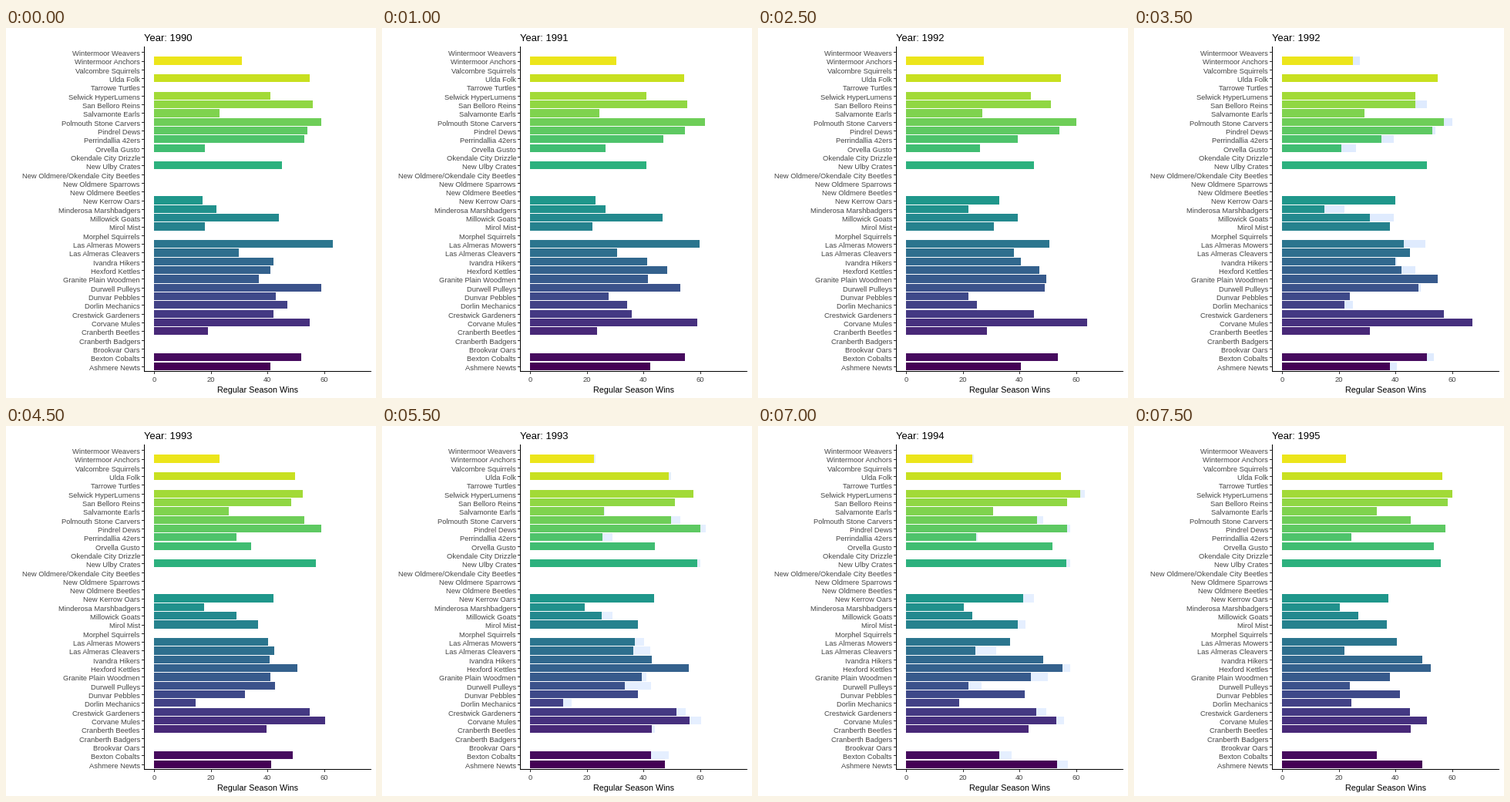
A matplotlib script for the animation above (8000 ms loop, 480 by 480 pixels).

```python
import numpy as np
import matplotlib
import matplotlib.pyplot as plt
from matplotlib.animation import FuncAnimation
from matplotlib.patches import Rectangle

SIZE, DPI = 480, 96
FRAMES, INTERVAL = 16, 500
FIRST_YEAR = 1990
KEYS = [0, 3, 7, 10, 13, 17]          # frames that land exactly on a season
X0, PER_WIN = 192.035, 3.679          # pixel of zero wins, pixels per win
Y0, ROW = 438.613, 11.317             # centre of the lowest row, row pitch
GREY, TICK = "#444444", "#333333"
TRAILS = ["#e5efff", "#eaf3ff", "#dfebfe", "#e5efff", "#e5efff", "#e5efff"]

names, wins = [], []


def team(name, *seasons):
    names.append(name)
    wins.append(seasons or (0,) * len(KEYS))


# bottom row first; wins for 1990 to 1995
team("Ashmere Newts", 41, 43, 38, 43, 57, 42)
team("Bexton Cobalts", 52, 56, 51, 48, 32, 35)
team("Brookvar Oars")
team("Cranberth Badgers")
team("Cranberth Beetles", 19, 26, 31, 44, 41, 50)
team("Corvane Mules", 55, 61, 67, 57, 55, 47)
team("Crestwick Gardeners", 42, 33, 57, 54, 47, 43)
team("Dorlin Mechanics", 47, 28, 22, 11, 13, 36)
team("Dunvar Pebbles", 43, 20, 24, 36, 42, 41)
team("Durwell Pulleys", 59, 50, 48, 40, 20, 28)
team("Granite Plain Woodmen", 37, 44, 55, 34, 50, 26)
team("Hexford Kettles", 41, 52, 42, 55, 58, 47)
team("Ivandra Hikers", 42, 41, 40, 41, 47, 52)
team("Las Almeras Cleavers", 30, 31, 45, 41, 27, 17)
team("Las Almeras Mowers", 63, 58, 43, 39, 33, 48)
team("Morphel Squirrels")
team("Mirol Mist", 18, 24, 38, 36, 42, 32)
team("Millowick Goats", 44, 48, 31, 28, 20, 34)
team("Minderosa Marshbadgers", 22, 29, 15, 19, 20, 21)
team("New Kerrow Oars", 17, 26, 40, 43, 45, 30)
team("New Oldmere Beetles")
team("New Oldmere Sparrows")
team("New Oldmere/Okendale City Beetles")
team("New Ulby Crates", 45, 39, 51, 60, 57, 55)
team("Okendale City Drizzle")
team("Orvella Gusto", 18, 31, 21, 41, 50, 57)
team("Perrindallia 42ers", 53, 44, 35, 26, 25, 24)
team("Pindrel Dews", 54, 55, 53, 62, 56, 59)
team("Polmouth Stone Carvers", 59, 63, 57, 51, 47, 44)
team("Salvamonte Earls", 23, 25, 29, 25, 28, 39)
team("San Belloro Reins", 56, 55, 47, 49, 55, 62)
team("Selwick HyperLumens", 41, 41, 47, 55, 63, 57)
team("Tarrowe Turtles")
team("Ulda Folk", 55, 54, 55, 47, 53, 60)
team("Valcombre Squirrels")
team("Wintermoor Anchors", 31, 30, 25, 22, 24, 21)
team("Wintermoor Weavers")

# progress in seasons, bar lengths and rounded season for every frame
progress = np.interp(range(FRAMES), KEYS, range(len(KEYS)))
lengths = np.array([[np.interp(p, range(len(KEYS)), w) for w in wins]
                    for p in progress])
season = np.floor(progress + 0.5 + 1e-9).astype(int)


def snap(v):
    return int(np.floor(v + 0.5))


def px_x(value):
    return snap(X0 + PER_WIN * value)


fig = plt.figure(figsize=(SIZE / DPI, SIZE / DPI), dpi=DPI, facecolor="white")
ax = fig.add_axes([0, 0, 1, 1])
ax.set_xlim(0, SIZE)
ax.set_ylim(SIZE, 0)
ax.axis("off")


def box(left, top, right, bottom, color, z=1):
    patch = Rectangle((left, top), right - left, bottom - top, facecolor=color,
                      linewidth=0, antialiased=False, zorder=z)
    return ax.add_patch(patch)


def write(x, y, text, size, color="black", ha="left"):
    return ax.text(x, y, text, fontsize=size * 72 / DPI, color=color, ha=ha,
                   va="baseline", family="Liberation Sans")


left = px_x(0)
viridis = matplotlib.colormaps["viridis"]
bars, trails = [], []
for i, name in enumerate(names):
    y = Y0 - i * ROW
    top, bottom = snap(y - 0.45 * ROW), snap(y + 0.45 * ROW)
    trails.append(box(left, top, left, bottom, "white", 2))
    bars.append(box(left, top, left, bottom, viridis(i / (len(names) - 1)), 3))
    box(176, snap(y), 179, snap(y) + 1, TICK)
    write(174, snap(y + 4.9), name, 9.4, GREY, "right")

for value in range(0, 61, 20):
    x = px_x(value)
    box(x, 446, x + 1, 449, TICK)
    write(x, 459, str(value), 9.4, GREY, "center")

box(179, 24, 180, 446, "black", 4)
box(179, 445, 474, 446, "black", 4)
write(326, 473, "Regular Season Wins", 10.8, ha="center")
title = write(179, 17, "", 13)


def update(k):
    # the pale trail keeps the longest bar since the season label changed
    start = int(np.argmax(season == season[k]))
    peaks = lengths[start:k + 1].max(axis=0)
    for bar, trail, now, peak in zip(bars, trails, lengths[k], peaks):
        bar.set_width(px_x(now) - left)
        trail.set_width(px_x(peak) - left)
        trail.set_facecolor(TRAILS[season[k]])
    title.set_text(f"Year: {FIRST_YEAR + season[k]}")
    return [*trails, *bars, title]


anim = FuncAnimation(fig, update, frames=FRAMES, interval=INTERVAL,
                     repeat=True, repeat_delay=0, blit=False)
plt.show()
```
